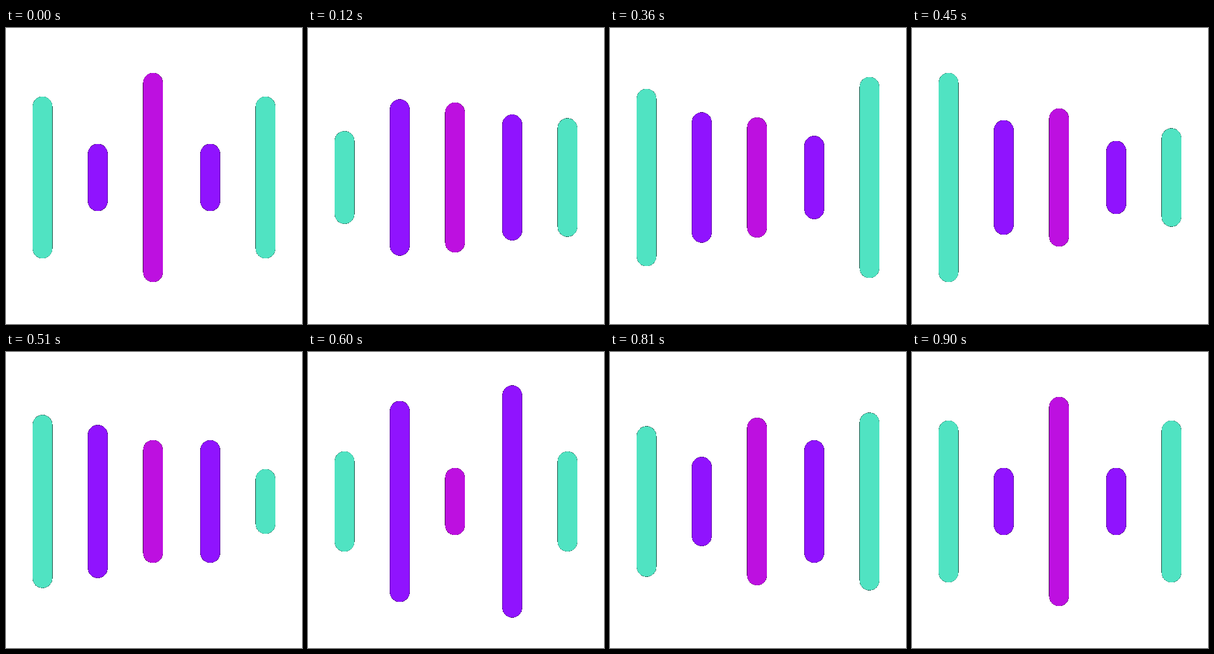
Recreate the animation shown at these times as an HTML page. Size 500 px wide and 500 px high, loop 930 ms.

```html
<!DOCTYPE html>
<html lang="en">
<head>
<meta charset="utf-8">
<title>Sound bars</title>
<style>
  html, body { margin: 0; width: 100%; height: 100%; overflow: hidden; background: #fff; }
  svg { display: block; width: 100%; height: 100%; }
</style>
</head>
<body>
<svg viewBox="0 0 500 500">
  <!-- partly covered edge pixels darken towards black instead of fading out -->
  <filter id="edge" filterUnits="userSpaceOnUse" x="0" y="0" width="500" height="500"
          color-interpolation-filters="sRGB">
    <feColorMatrix values="0 0 0 0 0  0 0 0 0 0  0 0 0 0 0  0 0 0 100 -25" result="mask"/>
    <feComposite in="SourceGraphic" in2="mask" operator="atop"/>
  </filter>
  <g id="bars" filter="url(#edge)"></g>
</svg>
<script>
const STEP = 30, STEPS = 31, LAST = STEPS - 1;
const MID = 252.5, UNIT = 10 / 3, WIDTH = 10 * UNIT, PITCH = 28 * UNIT;
const COLORS = ['#bd10e0', '#9013fe', '#50e3c2']; // from the centre outwards

// One bar per row: top edge at rest, then the turning points [step, top edge]
const motions = [
  [116, [6, 192], [15, 76], [20, 168]],
  [196, [6, 98], [15, 156], [19.3, 82]],
  [76, [8, 176], [15, 136], [21.7, 205]],
  [196, [7, 116], [14, 196], [22, 36]],
  [116, [5, 156], [11, 76], [17, 198], [25, 96]]
];

// cubic-bezier(.42, 0, .58, 1)
function ease(x) {
  let lo = 0, hi = 1;
  for (let i = 0; i < 24; i++) {
    const s = (lo + hi) / 2;
    if (s * (1.26 + s * (0.52 * s - 0.78)) < x) lo = s;
    else hi = s;
  }
  return lo * lo * (3 - 2 * lo);
}

function topAt(keys, step) {
  const i = Math.max(1, keys.findIndex(k => k[0] >= step));
  const [t0, v0] = keys[i - 1], [t1, v1] = keys[i];
  return v0 + (v1 - v0) * ease((step - t0) / (t1 - t0));
}

function makeBar([rest, ...turns], i) {
  const el = document.createElementNS('http://www.w3.org/2000/svg', 'rect');
  const gap = i > 2 ? UNIT : 0; // the right pair sits one unit further out
  el.setAttribute('x', 45 + i * PITCH + gap);
  el.setAttribute('width', WIDTH);
  el.setAttribute('rx', WIDTH / 2);
  el.setAttribute('fill', COLORS[Math.abs(i - 2)]);
  document.getElementById('bars').append(el);
  return { el, keys: [[0, rest], ...turns, [LAST, rest]] };
}

const bars = motions.map(makeBar);

function draw(ms) {
  const step = Math.floor(ms / STEP) % STEPS;
  for (const { el, keys } of bars) {
    const y = topAt(keys, step) - UNIT / 20;
    el.setAttribute('y', y);
    el.setAttribute('height', 2 * (MID - y));
  }
}

let start = null;
function tick(now) {
  start ??= now;
  draw(now - start);
  requestAnimationFrame(tick);
}
draw(0);
requestAnimationFrame(tick);
</script>
</body>
</html>
```
